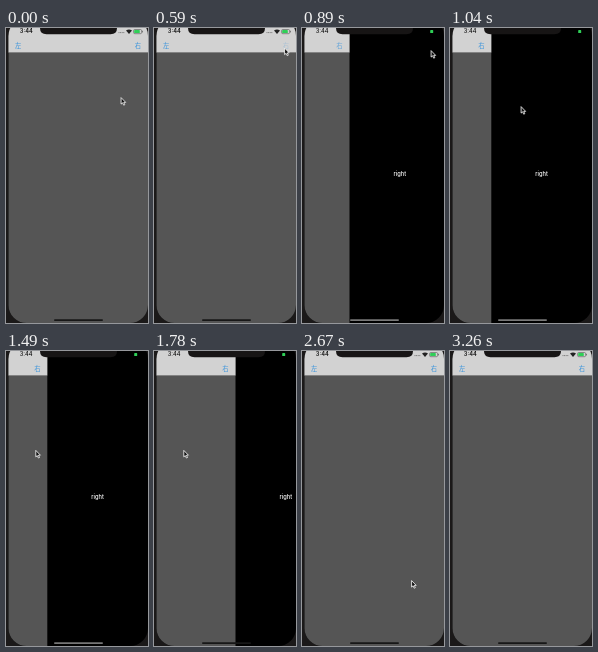
An HTML page that plays this animation: 142 by 295 pixels, repeating every 3.36 s.

```html
<!DOCTYPE html>
<html lang="zh">
<head>
<meta charset="utf-8">
<style>
  html, body { margin: 0; width: 100%; height: 100%; overflow: hidden; background: #1b1919; }
  svg { display: block; width: 142px; height: 295px; }
  text { font: 500 5.7px Inter, "Liberation Sans", sans-serif; }
  .item { font: 6.3px "Noto Sans CJK SC", "Noto Sans CJK JP", sans-serif; fill: #3692dc; text-anchor: middle; }
</style>
</head>
<body>
<svg viewBox="0 0 142 295">
  <clipPath id="screen"><rect x="2.5" y="-10" width="139.5" height="305" rx="18"/></clipPath>
  <g clip-path="url(#screen)">
    <rect width="142" height="295"/>
    <g id="main">
      <rect width="142" height="295" fill="#555"/>
      <rect width="142" height="24.3" fill="#d2d2d2"/>
      <rect y="24.3" width="142" height=".5" fill="#8c8c8c"/>
      <text class="item" x="12.2" y="19.6">左</text>
      <text class="item" id="rightItem" x="132" y="19.6">右</text>
    </g>
    <text id="label" y="147.6" fill="#fff" text-anchor="middle">right</text>
    <text id="clock" x="13.8" y="5.4" fill="#111">3:44</text>
    <g id="status">
      <path d="M112.5 4.6h6" stroke="#777" stroke-width="1" stroke-dasharray="1 .6"/>
      <path d="M120 2.6q3-2.4 6 0l-3 3.4z" fill="#222"/>
      <rect x="127.6" y="1.5" width="8" height="4.2" rx="1.2" fill="none" stroke="#555" stroke-width=".6"/>
      <path d="M136.5 2.8v1.6" stroke="#555" stroke-width=".7"/>
    </g>
    <rect id="charge" x="128.2" y="2.1" height="3" rx=".6" fill="#2fcf57"/>
    <rect id="home" x="48" y="291.2" width="49" height="1.8" rx=".9"/>
  </g>
  <path d="M34 0V-2H111V0Q111 6.2 104.5 6.2H40.5Q34 6.2 34 0Z" fill="#171515"/>
  <path id="cursor" d="M.6.6V7.1L2.1 5.8 3.2 8.2 4.3 7.7 3.2 5.4H5.2Z" fill="#111" stroke="#fff" stroke-width=".8" stroke-linejoin="round"/>
</svg>
<script>
const LOOP = 3360, OPEN = 142;
// start time, pointer x, pointer y, right edge of the main view
const steps = [
  [0, 114.5, 69], [150, 123.5, 40], [300, 129, 27], [450, 130, 20], [590, 130, 19.5],
  [740, 130, 18.8, 114.5], [890, 128.5, 22, 47.5], [1040, 70.5, 78, 41.3], [1190, 38, 97, 41.3],
  [1340, 30, 98, 41.3], [1490, 29.2, 98.8, 41.3], [1780, 29.2, 98.8, 81.5], [1930, 29.2, 98.8],
  [2080, 42, 97], [2220, 55, 96], [2370, 55, 97], [2520, 69, 122.5], [2670, 109, 229],
  [2820, 112, 239.5], [2970, 120, 274.5], [3110, 126, 287.5], [3260, 126, 300]
];
const $ = id => document.getElementById(id);
const set = (id, name, value) => $(id).setAttribute(name, value);

function draw(now) {
  const t = now % LOOP;
  const [start, x, y, edge = OPEN] = steps.findLast(s => s[0] <= t);
  const closed = edge === OPEN;
  const pressed = start === 590 || start === 740;
  set("main", "transform", `translate(${edge - OPEN})`);
  set("label", "x", edge + 50.3);
  set("cursor", "transform", `translate(${x} ${y})`);
  set("rightItem", "opacity", pressed ? 0.25 : start === 890 ? 0.75 : 1);
  set("status", "visibility", closed ? "visible" : "hidden");
  set("charge", "width", closed ? 5.6 : 3);
  set("clock", "font-weight", closed ? 600 : 500);
  $("clock").style.fontWeight = closed ? 600 : 500;
  set("home", "fill", edge < 72 ? "#777" : "#171717");
  requestAnimationFrame(draw);
}
requestAnimationFrame(draw);
</script>
</body>
</html>
```
